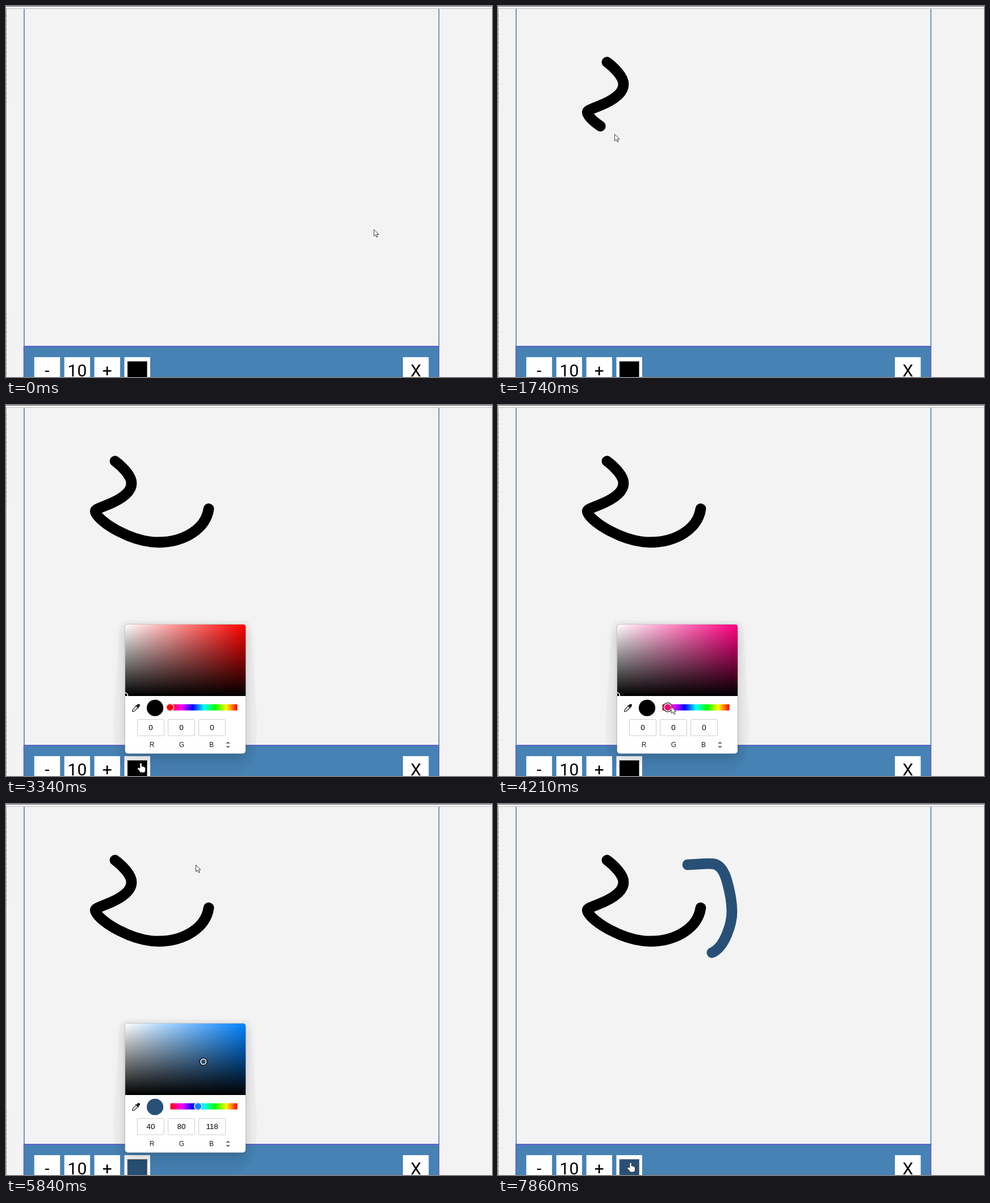
These frames come from a looping animation (856x654 px, 8000 ms). An HTML page:

```html
<!DOCTYPE html>
<html lang="en">
<head>
<meta charset="utf-8">
<title>Drawing board</title>
<style>
  html, body { margin: 0; width: 100%; height: 100%; overflow: hidden; background: #f3f3f3; }
  svg { display: block; width: 100%; height: 100%; }
  text { text-anchor: middle; }
  .bar { font: 30px Roboto, sans-serif; }
  .rgb { font: 13.33px "Liberation Sans", Arial, sans-serif; }
  .label { font-size: 12px; fill: #222; }
  .ink { fill: none; stroke-width: 18.8; stroke-linecap: round; stroke-linejoin: round; }
  .shade { filter: drop-shadow(0 0 1px rgba(0,0,0,.4)) drop-shadow(0 9px 10px rgba(0,0,0,.16)); }
</style>
</head>
<body>
<svg viewBox="0 0 856 654">
  <defs>
    <linearGradient id="sat">
      <stop stop-color="#fff"/><stop offset="1" stop-color="#fff" stop-opacity="0"/>
    </linearGradient>
    <linearGradient id="val" x2="0" y2="1">
      <stop stop-opacity="0"/><stop offset="1"/>
    </linearGradient>
    <linearGradient id="hues"></linearGradient>
    <clipPath id="field"><path d="M210 513V391Q210 387 214 387H418Q422 387 422 391V513Z"/></clipPath>
  </defs>

  <rect width="856" height="654" fill="#f3f3f3"/>
  <path d="M.5 5V654" stroke="#aaa"/>
  <path d="M.5 16V178M.5 541V654" stroke="#777" stroke-dasharray="3 5"/>
  <path d="M0 .5H856" stroke="#666"/>
  <path d="M0 4.5H856" stroke="#c2c2c2"/>
  <path d="M32 5V600M762.5 5V600" stroke="#4682b4" stroke-width="1.6"/>

  <g id="inks" class="ink"></g>

  <rect x="31" y="599" width="732" height="60" fill="#4682b4"/>
  <path d="M31.7 654V600.2H762.3V654" fill="none" stroke="#6062cd" stroke-width="2"/>
  <g id="buttons" class="bar"></g>
  <rect id="swatch" x="214" y="626.5" width="34.5" height="40" stroke="#777"/>

  <g id="picker" class="rgb">
    <path d="M212 380H420Q431 380 432 396L442 560Q443 650 400 652H232Q188 650 189 560L200 396Q201 380 212 380Z" opacity=".025"/>
    <rect class="shade" x="209.7" y="387" width="212.3" height="227.5" rx="5" fill="#fff"/>
    <g clip-path="url(#field)">
      <rect id="base" x="210" y="387" width="212" height="126"/>
      <rect x="210" y="387" width="212" height="126" fill="url(#sat)"/>
      <rect x="210" y="387" width="212" height="126" fill="url(#val)"/>
      <g id="spot">
        <circle r="7"/><circle r="5.7" fill="#fff"/><circle id="spotFill" r="4"/>
      </g>
    </g>
    <g transform="translate(229 534) rotate(45)" fill="none" stroke="#222" stroke-width="1.1">
      <path d="M-2-2V6L0 9 2 6V-2"/>
      <path d="M-4-2.5H4M-2-3V-7Q0-10 2-7V-3Z" fill="#222"/>
    </g>
    <circle id="current" cx="262.5" cy="534" r="14.6"/>
    <rect x="289.5" y="527.5" width="118" height="11" rx="1" fill="url(#hues)"/>
    <g id="thumb">
      <circle id="focus" r="8.4" fill="#111"/>
      <circle r="7.2" fill="#fff" stroke="#bbb" stroke-width=".5"/>
      <circle id="thumbFill" r="5.8"/>
    </g>
    <g id="fields"></g>
    <path d="M388.5 597L391 594.5 393.5 597M388.5 601L391 603.5 393.5 601" fill="none" stroke="#222" stroke-width="1.2"/>
  </g>

  <g id="cursor" fill="#fff" stroke-linejoin="round">
    <path id="arrow" d="M0 0V11.8L2.8 9.2 4.8 13.6 6.7 12.8 4.9 8.5H8.4Z" stroke="#333" stroke-width=".95"/>
    <path id="hand" d="M-1.7 9V1.5Q-1.6 0 0 0T1.7 1.5V6Q3.3 5 4.2 6.6 5.7 5.8 6.3 7.5 8 7.2 8.2 9V12Q8 14 6.7 17H-.8Q-2.4 14-4.6 12L-6 10Q-6.4 8-4.4 8.2Z" stroke="#111" stroke-width=".9"/>
  </g>
</svg>
<script>
const LOOP = 8000, STEP = 120;
const OPEN = 3220, CLOSE = 5960;
const $ = id => document.getElementById(id);
const attr = (id, name, value) => $(id).setAttribute(name, value);
const show = (id, on) => attr(id, 'visibility', on ? 'visible' : 'hidden');
const place = (id, x, y) => attr(id, 'transform', `translate(${x.toFixed(2)} ${y.toFixed(2)})`);
const clamp = u => Math.max(0, Math.min(1, u));
const span = (t, from, to) => clamp((t - from) / (to - from));
const smooth = u => u * u * (3 - 2 * u);

const hsv = (h, s, v) => [5, 3, 1].map(n => {
  const k = (n + h / 60) % 6;
  return Math.round(255 * v * (1 - s * clamp(Math.min(k, 4 - k))));
});
const css = c => `rgb(${c})`;

$('hues').innerHTML = Array.from({ length: 7 }, (_, i) =>
  `<stop offset="${i / 6}" stop-color="${css(hsv(360 - 60 * i, 1, 1))}"/>`).join('');

$('buttons').innerHTML = ['-', '10', '+', '', 'X'].map((label, i) => {
  const x = label === 'X' ? 721.8 : 72.5 + 52.9 * i;
  return `<rect x="${x - 22.7}" y="619" width="45.4" height="45" fill="#fff"/><text x="${x}" y="652.6">${label}</text>`;
}).join('');

$('fields').innerHTML = [...'RGB'].map((name, i) => {
  const x = 255 + 54 * i;
  return `<rect x="${x - 23.5}" y="554.5" width="47" height="28.5" rx="2" fill="#fff" stroke="#ccc"/>
    <text id="num${i}" x="${x}" y="573.3">0</text><text class="label" x="${257 + 52.5 * i}" y="603.3">${name}</text>`;
}).join('');

// Pointer journey: legs with ink leave a stroke, the pointer runs ahead of it by lead
const legs = [
  { from: 0, to: 370, d: 'M648 394Q600 150 320 140' },
  { from: 500, to: 870, d: 'M320 140Q230 108 192 99' },
  { from: 1120, to: 2220, ink: '#000', lead: 29, ease: u => u ** 1.41,
    d: 'M192 99C203 107 221 124 221 138C221 157 194 170 176 177S156 185 158 190C166 208 222 242 268 242S352 218 357 183' },
  { from: 2220, to: 2460, d: 'M357 183Q300 420 239 561' },
  { from: 2460, to: 2940, d: 'M239 561L237.5 631' },
  { from: 3340, to: 3940, d: 'M237.5 631L291 532' },
  { from: 4040, to: 4530, d: 'M291 532L342 531' },
  { from: 4600, to: 4970, d: 'M342 531L347 454' },
  { from: 5090, to: 5650, d: 'M347 454Q450 230 334.5 107.5' },
  { from: 5960, to: 7190, ink: '#285076', lead: 9, ease: u => u ** 0.84,
    d: 'M334 107C350 107 372 103 382 106S399 121 403 135 412 170 412 190 400 252 377 262' },
  { from: 7190, to: 7590, d: 'M377 262Q320 330 248 556' },
  { from: 7590, to: 7860, d: 'M248 556L233.5 632' }
];

for (const leg of legs) {
  leg.path = document.createElementNS('http://www.w3.org/2000/svg', 'path');
  leg.path.setAttribute('d', leg.d);
  leg.size = leg.path.getTotalLength();
  if (!leg.ink) continue;
  leg.path.setAttribute('stroke', leg.ink);
  $('inks').append(leg.path);
}

const travelled = ({ from, to, size, ease = smooth }, t) => size * ease(span(t, from, to));

function drawStroke(leg, t) {
  leg.path.setAttribute('visibility', t < leg.from ? 'hidden' : 'visible');
  leg.path.setAttribute('stroke-dasharray', `${travelled(leg, t)} ${leg.size + 20}`);
}

function drawPicker(t) {
  const pick = smooth(span(t, 4720, 4970));
  const h = 360 - 150.77 * smooth(span(t, 4060, 4580)), s = 0.661 * pick, v = 0.4627 * pick;
  const color = hsv(h, s, v), pure = css(hsv(h, 1, 1));
  show('picker', t >= OPEN && t < CLOSE);
  attr('base', 'fill', pure);
  attr('thumbFill', 'fill', pure);
  attr('focus', 'opacity', t >= 4090 && t < 4840 ? 1 : 0);
  place('thumb', 289 + 118 * (1 - h / 360), 533);
  place('spot', 209.5 + 209 * s, 512 - 125 * v);
  for (const id of ['swatch', 'current', 'spotFill']) attr(id, 'fill', css(color));
  color.forEach((c, i) => { $('num' + i).textContent = c; });
}

function drawCursor(t) {
  const leg = legs.findLast(l => l.from <= t);
  const done = travelled(leg, t);
  const { x, y } = leg.path.getPointAtLength(done + Math.min(done, leg.lead || 0));
  const hover = y > 619;
  show('arrow', !hover);
  show('hand', hover);
  place('cursor', x, y);
}

// The screen refreshes every STEP ms, restarting after each hiccup
const hiccups = [0, 630, 1120, 1740, 3220, 4090, 4600, 4970, 5840, 6110, 6500, 6950, 7350, 7740];
function refreshed(ms) {
  const start = hiccups.findLast(h => h <= ms);
  return start + Math.floor((ms - start) / STEP) * STEP;
}

function render(ms) {
  const t = refreshed(ms);
  legs.filter(l => l.ink).forEach(l => drawStroke(l, t));
  drawPicker(t);
  drawCursor(t);
}

const began = performance.now();
function loop() {
  render((performance.now() - began) % LOOP);
  requestAnimationFrame(loop);
}
render(0);
requestAnimationFrame(loop);
</script>
</body>
</html>
```
